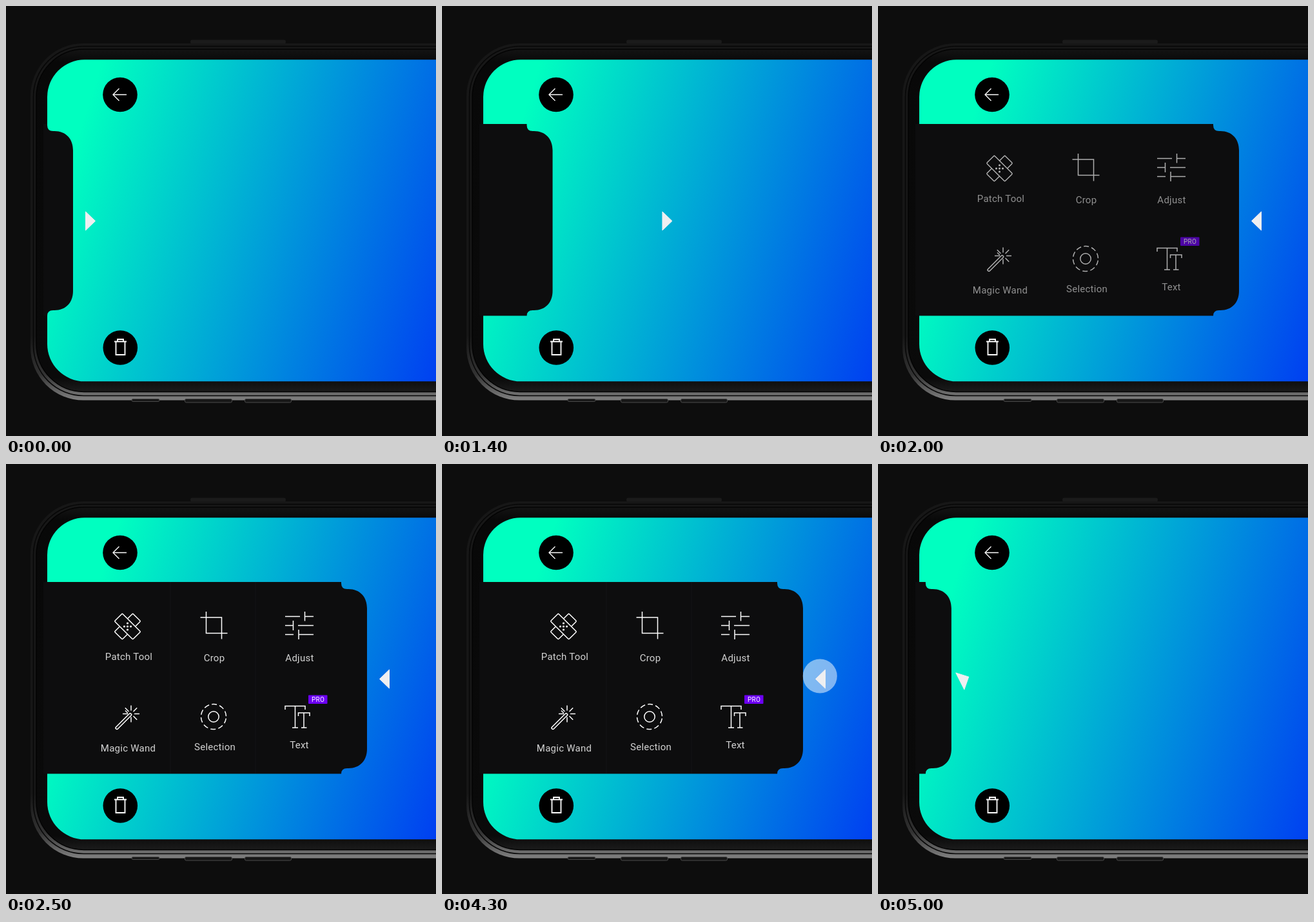
An HTML page for the animation above (5.1 s loop, 667 by 667 pixels).

```html
<!DOCTYPE html>
<html lang="en">
<head>
<meta charset="utf-8">
<title>Slide-out tool panel</title>
<style>
  html, body { margin: 0; width: 100%; height: 100%; overflow: hidden; background: #0d0d0d; }
  svg { display: block; width: 100vw; height: 100vh; }
  text { font-family: Roboto, sans-serif; text-anchor: middle; }
  .label { font-size: 15px; letter-spacing: .25px; fill: #d2d2d2; }
  .line { fill: none; stroke: #fff; stroke-width: 1.5; }
  .thin { stroke-width: 1.3; }
  .bold { stroke-width: 1.8; }
  .dots { stroke-width: 3.2; stroke-linecap: round; }
</style>
</head>
<body>
<svg viewBox="0 0 667 667" xmlns="http://www.w3.org/2000/svg">
  <defs>
    <linearGradient id="sky" gradientUnits="userSpaceOnUse" x1="160" y1="52" x2="808" y2="263">
      <stop offset="0" stop-color="#00ffc0"/>
      <stop offset="1" stop-color="#0036f4"/>
    </linearGradient>
    <linearGradient id="rim" gradientUnits="userSpaceOnUse" x1="0" y1="512" x2="0" y2="612">
      <stop offset="0" stop-color="#171717"/>
      <stop offset=".6" stop-color="#333"/>
      <stop offset=".88" stop-color="#6a6a6a"/>
      <stop offset="1" stop-color="#828282"/>
    </linearGradient>
    <linearGradient id="bezel" gradientUnits="userSpaceOnUse" x1="0" y1="66" x2="0" y2="598">
      <stop offset="0" stop-color="#141414"/>
      <stop offset=".04" stop-color="#080808"/>
      <stop offset=".96" stop-color="#0a0a0a"/>
      <stop offset="1" stop-color="#1b1b1b"/>
    </linearGradient>
    <clipPath id="inside"><path id="clipShape"/></clipPath>
  </defs>

  <rect width="667" height="667" fill="#0d0d0d"/>

  <!-- phone body -->
  <rect x="286" y="52.5" width="148" height="6" rx="3" fill="#1b1b1b"/>
  <rect x="38" y="58" width="800" height="553.5" rx="82" fill="url(#rim)"/>
  <rect x="42.5" y="62.5" width="800" height="542" rx="78" fill="none" stroke="#070707" stroke-width="1.5"/>
  <rect x="47" y="67" width="800" height="531.5" rx="74" fill="url(#bezel)" stroke="#030303" stroke-width="1.5"/>
  <g fill="#171717" stroke="#4a4a4a">
    <rect x="195" y="609.5" width="43" height="4" rx="2"/>
    <rect x="277.5" y="609.5" width="73" height="5.5" rx="2"/>
    <rect x="370.5" y="609.5" width="72" height="5.5" rx="2"/>
  </g>

  <!-- screen -->
  <rect x="64" y="83.3" width="800" height="499" rx="58" fill="url(#sky)"/>
  <path id="panel" fill="#0d0d0e"/>

  <g clip-path="url(#inside)">
    <path id="split" d="M255 183V480M387 183V480" stroke="#151516"/>
    <g id="tools">
      <g class="line" transform="translate(188.5 252)">
        <rect x="-20" y="-8.5" width="40" height="17" rx="1.5" transform="rotate(45)"/>
        <path transform="rotate(-45)" d="M-8.5-8.5H-18.5Q-20-8.5-20-7V7Q-20 8.5-18.5 8.5H-8.5M8.5-8.5H18.5Q20-8.5 20-7V7Q20 8.5 18.5 8.5H8.5"/>
        <path class="dots" d="M0-5h.01M-5 0h.01M0 0h.01M5 0h.01M0 5h.01"/>
      </g>
      <path class="line" d="M301.5 238H334.5V271.5M310.5 229V262.5H343.5"/>
      <path class="line" d="M433 236.5H456M463.5 229V243.5M463.5 236.5H477M433 250.5H445.5M445.5 243V258M453 250.5H477M433 264.5H446M454 257V272M454 264.5H477"/>
      <g class="line" transform="translate(194 387.5)">
        <rect x="-33" y="-2" width="33" height="4" rx="2" transform="rotate(-45)"/>
        <path d="M-9-5L-5-1"/>
        <path id="rays"/>
      </g>
      <g class="line" transform="translate(322 392)">
        <circle r="19.5" stroke-dasharray="8 4.25" transform="rotate(8)"/>
        <circle r="8.2"/>
      </g>
      <path class="line" d="M433 381V375.5H464V381M448.5 375.5V409M444 409H453M453.5 391V386H471V391M462 386V409M458 409H466.5"/>
      <rect x="469" y="358.5" width="29.5" height="13.5" rx="1" fill="#6c00f2"/>
      <text x="484" y="368.8" font-size="10" letter-spacing=".2" fill="#fff">PRO</text>
      <text class="label" x="190.5" y="304">Patch Tool</text>
      <text class="label" x="323" y="306">Crop</text>
      <text class="label" x="455.5" y="306">Adjust</text>
      <text class="label" x="189.5" y="446">Magic Wand</text>
      <text class="label" x="324" y="444">Selection</text>
      <text class="label" x="455" y="441">Text</text>
    </g>
  </g>

  <!-- round buttons -->
  <circle cx="177" cy="137.5" r="26.8"/>
  <path class="line thin" d="M187 137.5H166.5M175.5 128L166 137.5L175.5 147"/>
  <circle cx="177.3" cy="530" r="26.8"/>
  <path class="line bold" d="M168 520.5H187M173 520.5V517H182V520.5M170.5 520.5V541H184.5V520.5"/>

  <circle id="touch" fill="#fff"/>
  <path id="arrow" fill="#efeff1" stroke="#efeff1" stroke-linejoin="round" d="M-7.5-14.5L7.5 0L-7.5 14.5Z"/>
</svg>

<script>
  const LOOP = 5100, STEP = 100, OPEN = 456, NUDGE = 14;
  const $ = id => document.getElementById(id);

  function set(id, attrs) {
    for (const name in attrs) $(id).setAttribute(name, attrs[name]);
  }

  // progress 0..1 between two times, linear or eased in and out
  const ramp = (t, from, to) => Math.min(1, Math.max(0, (t - from) / (to - from)));
  const cubic = u => u < .5 ? 4 * u ** 3 : 1 - 4 * (1 - u) ** 3;
  const ease = (t, from, to) => cubic(ramp(t, from, to));

  const panelPath = o => `M58 183H${64 + o}V185q0 9 9 9h2c18 0 29 12 29 30V442` +
    `c0 18 -11 30 -29 30h-2q-9 0 -9 8.5H58Z`;

  // sparkle around the wand tip, open where the stick passes
  let rays = "";
  for (let a = -Math.PI; a < 2; a += Math.PI / 4) {
    const c = Math.cos(a), s = Math.sin(a);
    rays += `M${5 * c} ${5 * s}L${13 * c} ${13 * s}`;
  }
  set("rays", { d: rays });

  // a tap spreads from its start and fades within half a second
  function drawTouch(age, cx, cy) {
    const alpha = Math.max(0, Math.min(age / 300, (500 - age) / 600));
    set("touch", { cx, cy, r: Math.max(0, 18 + age * .057), opacity: alpha });
  }

  function draw(t) {
    const open = ease(t, 1200, 1800) - ease(t, 4530, 5100);
    const slide = NUDGE * ramp(t, 600, 700) + (OPEN - NUDGE) * ease(t, 1115, 1700) - OPEN * ease(t, 4500, 5067);
    const turn = 180 * (ease(t, 4800, 5100) - ease(t, 1500, 1800));
    const leave = ramp(t, 4500, 4700);
    const d = panelPath(OPEN * open);

    set("panel", { d });
    set("clipShape", { d });
    set("sky", { x1: 160 + 28 * open });
    set("tools", { opacity: ramp(t, 1700, 2150) - leave });
    set("split", { opacity: ramp(t, 2000, 2400) - leave });
    set("arrow", { transform: `translate(${131 + slide} 333.5) rotate(${turn})` });

    if (t < LOOP / 2) drawTouch(t - 400, 140, 337);
    else drawTouch(t - 4150, 586.3, 329);
  }

  const start = performance.now();
  function tick() {
    const t = (performance.now() - start) % LOOP;
    draw(Math.floor(t / STEP) * STEP);
    requestAnimationFrame(tick);
  }
  tick();
</script>
</body>
</html>
```
